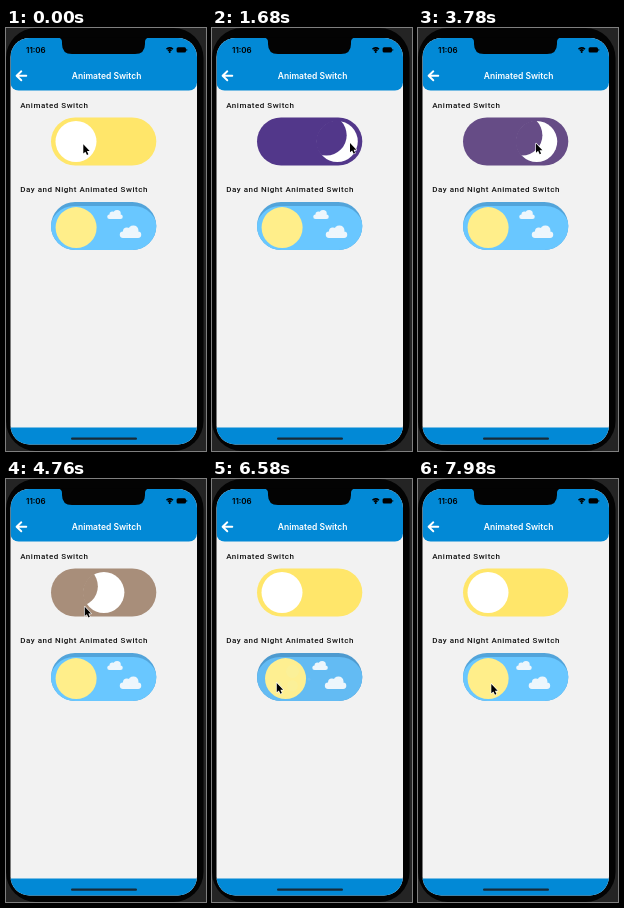
Recreate the animation shown at these times as an HTML page with a canvas. Size 200 by 423 pixels, loop 8000 ms.

```html
<!DOCTYPE html>
<html lang="en">
<head>
<meta charset="utf-8">
<title>Animated Switch</title>
<style>
html, body { margin: 0; width: 100%; height: 100%; overflow: hidden; background: #030303; }
canvas { display: block; width: 200px; height: 423px; }
</style>
</head>
<body>
<canvas id="stage"></canvas>
<script>
const W = 200, H = 423, LOOP = 8000;
const BLACK = '#030303', BLUE = '#0289d6', CLOUD = '#edf6fc';
const canvas = document.getElementById('stage');
const c = canvas.getContext('2d');
const ratio = window.devicePixelRatio || 1;
canvas.width = W * ratio;
canvas.height = H * ratio;

// Click times: each one flips its switch, starting from day.
const PLAIN_CLICKS = [90, 1660, 2740, 3650, 4460, 5040];
const SKY_CLICKS = [6490, 7150];

// The pointer rests at a place until the next trip begins.
const TRIP = 580;
const START = { x: 77.3, y: 116.3 };
const trip = (at, x, y) => ({ at, x, y });
const TRIPS = [
  trip(450, 138, 115), trip(1720, 65, 195), trip(2400, 78, 117),
  trip(2960, 118.3, 115), trip(3750, 82, 171), trip(4340, 78, 118),
  trip(4940, 118, 116), trip(5420, 63, 204), trip(6520, 120, 204),
  trip(7370, 73.3, 205)
];

const clamp = v => Math.max(0, Math.min(1, v));
const ease = v => { v = clamp(v); return v * v * (3 - 2 * v); };
const lerp = (a, b, p) => a + (b - a) * p;
const mix = (a, b, p) => `rgb(${a.map((v, i) => Math.round(lerp(v, b[i], p)))})`;

// 0 = day, 1 = night
const nightness = (clicks, t, duration) => clicks.reduce(
  (p, at, i) => lerp(p, 1 - i % 2, ease((t - at) / duration)), 0);

const pointerAt = t => TRIPS.reduce((from, to) => {
  const p = ease((t - to.at) / TRIP);
  return { x: lerp(from.x, to.x, p), y: lerp(from.y, to.y, p) };
}, START);

function box(x, y, w, h, r, fill) {
  c.beginPath();
  c.roundRect(x, y, w, h, r);
  c.fillStyle = fill;
  c.fill();
}

function disc(x, y, r, fill) {
  c.beginPath();
  c.arc(x, y, r, 0, 7);
  c.fillStyle = fill;
  c.fill();
}

function stroke(path, width, color) {
  c.lineWidth = width;
  c.strokeStyle = color;
  c.stroke(new Path2D(path));
}

function text(str, x, y, font, color, align = 'left', spacing = '0px') {
  c.font = font;
  c.fillStyle = color;
  c.textAlign = align;
  c.letterSpacing = spacing;
  c.fillText(str, x, y);
}

function clipped(shape, draw) {
  c.save();
  c.beginPath();
  shape();
  c.clip();
  draw();
  c.restore();
}

function drawStatus() {
  text('11:06', 20, 24.8, '600 8px Inter, sans-serif', '#000');
  for (const r of [2.3, 4.4]) {
    c.beginPath();
    c.arc(163.7, 24.3, r, -Math.PI * .76, -Math.PI * .24);
    c.lineWidth = 1.6;
    c.strokeStyle = '#000';
    c.stroke();
  }
  disc(163.7, 23.9, 1, '#000');
  box(170.6, 19.3, 9.4, 5.2, 1.5, '#000');
  box(180.4, 21, .8, 2, .4, '#000');
}

function drawPhone() {
  box(0, 0, W, H, 0, '#242424');
  box(0, 0, 197.5, H, 30, BLACK);
  clipped(() => c.roundRect(4.5, 10, 186.5, 406.5, 19), () => {
    box(4, 10, 188, 407, 0, '#f2f2f2');
    box(4.5, 10, 186.5, 52.5, [0, 0, 8, 8], BLUE);
    box(4, 399.4, 188, 18, 0, BLUE);
  });
  // Notch with flared upper corners
  c.fillStyle = BLACK;
  c.fill(new Path2D('M52 9.5q4 .5 4 4.5v2q0 10 10 10h63q10 0 10-10v-2q0-4 4-4.5z'));
  box(65, 409.6, 66, 2.2, 1.1, '#172a38');
  drawStatus();

  c.lineCap = c.lineJoin = 'round';
  stroke('M20.3 47.8h-9.5m4.5-4.5l-4.7 4.5l4.7 4.5', 1.9, '#fff');
  text('Animated Switch', 100.6, 50.5, '600 8.5px Inter, sans-serif', '#fff', 'center');
  const label = '500 8px Roboto, sans-serif';
  text('Animated Switch', 14.2, 79.8, label, '#111', 'left', '.52px');
  text('Day and Night Animated Switch', 14.2, 164.4, label, '#111', 'left', '.52px');
}

function drawPlainSwitch(t) {
  const p = nightness(PLAIN_CLICKS, t, 600);
  const track = mix([255, 230, 106], [81, 54, 138], p);
  const x = lerp(70, 125.5, p), y = 113.5;
  box(45, 89.5, 105.3, 48, 24, track);
  disc(x, y, 20.5, '#fff');
  // The shadow slides over the thumb and leaves a crescent.
  clipped(() => c.arc(x, y, 21, 0, 7), () =>
    disc(x - lerp(42, 10.8, p), y - 6.3, 20.3, track));
}

function drawCloud(x, y, s) {
  box(x - 10.5 * s, y, 21 * s, 6.3 * s, 3.1 * s, CLOUD);
  disc(x - 3.6 * s, y, 3.8 * s, CLOUD);
  disc(x + 2.8 * s, y - 1 * s, 5 * s, CLOUD);
}

function drawSkySwitch(t) {
  const p = nightness(SKY_CLICKS, t, 600);
  const drift = nightness(SKY_CLICKS, t, 1000);
  const dark = clamp(p / .85);
  const x = lerp(70.1, 125.5, p), y = 199.6;
  clipped(() => c.roundRect(45, 174, 105.3, 48, 24), () => {
    box(45, 174, 106, 48, 0, mix([82, 164, 218], [17, 25, 70], dark));
    box(44, 178, 107.5, 50, 24, mix([105, 199, 255], [27, 36, 86], dark));
    c.globalAlpha = dark;
    disc(82, 186.3, 2, '#e9f3fb');
    disc(69.3, 206.3, 2.4, '#e9f3fb');
    disc(97, 200.3, 1.5, '#e9f3fb');
    c.globalAlpha = clamp(1.2 - drift * 2);
    drawCloud(109 - 40 * drift, 186.4, .74);
    drawCloud(124.5 - 40 * drift, 203.5, 1.02);
    c.globalAlpha = 1;
    disc(x, y, 20.5, mix([255, 238, 138], [240, 252, 234], dark));
    clipped(() => c.arc(x, y, 20.5, 0, 7), () => {
      c.globalAlpha = dark;
      for (let i = 0; i < 3; i++) {
        const angle = i * 1.6 - .8;
        disc(x + 10 * Math.cos(angle), y + 10 * Math.sin(angle), 6.5 - i, '#d8f4ea');
      }
    });
  });
}

function drawPointer(t) {
  const { x, y } = pointerAt(t);
  const arrow = new Path2D('M0 0v9.2l2.1-1.8l1.6 3.3l1.4-.7l-1.5-3.2h2.8z');
  c.save();
  c.translate(x, y);
  c.lineWidth = 1.2;
  c.strokeStyle = '#fff';
  c.stroke(arrow);
  c.fillStyle = '#000';
  c.fill(arrow);
  c.restore();
}

const began = performance.now();
function frame() {
  const t = (performance.now() - began) % LOOP;
  c.setTransform(ratio, 0, 0, ratio, 0, 0);
  c.lineCap = 'butt';
  drawPhone();
  drawPlainSwitch(t);
  drawSkySwitch(t);
  drawPointer(t);
  requestAnimationFrame(frame);
}
frame();
</script>
</body>
</html>
```
